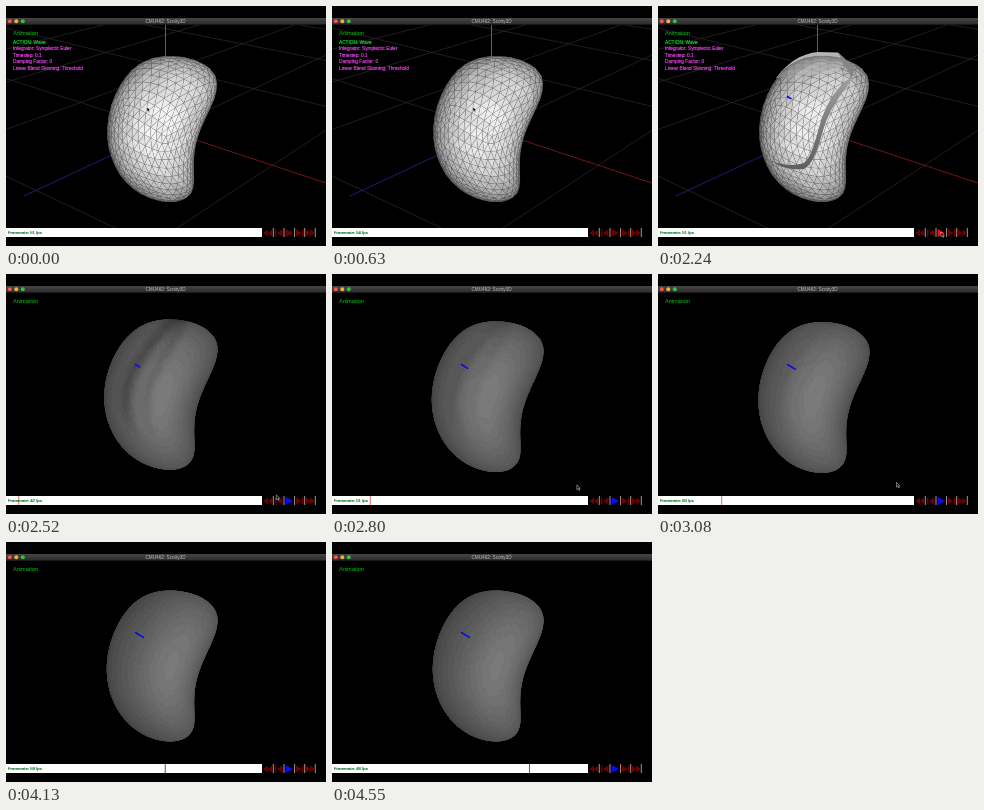
These frames come from a looping animation (320 by 240 pixels, 5110 ms). An HTML page with a canvas:

```html
<!DOCTYPE html>
<html lang="en">
<head>
<meta charset="utf-8">
<title>Mesh animation</title>
<style>
  html, body { margin: 0; width: 100%; height: 100%; overflow: hidden; background: #000; }
  canvas, svg { position: absolute; left: 0; top: 0; width: 320px; height: 240px; }
  text { font-family: "Liberation Sans", Arial, sans-serif; }
  .info { font-size: 4.75px; fill: #e040e0; stroke: #e040e0; stroke-width: .18; }
  .green { fill: #10d830; stroke: #10d830; }
</style>
</head>
<body>
<canvas id="scene" width="320" height="240"></canvas>
<svg viewBox="0 0 320 240">
  <defs>
    <linearGradient id="bar" x1="0" y1="0" x2="0" y2="1">
      <stop offset="0" stop-color="#454545"/><stop offset="1" stop-color="#2b2b2b"/>
    </linearGradient>
  </defs>
  <rect y="12" width="320" height="6.6" fill="url(#bar)"/>
  <circle cx="3.8" cy="15.3" r="2" fill="#f2564d"/>
  <circle cx="10.3" cy="15.3" r="2" fill="#f0b42e"/>
  <circle cx="16.8" cy="15.3" r="2" fill="#35c244"/>
  <text x="159.5" y="17.1" font-size="4.7" fill="#c0c0c0" text-anchor="middle">CMU462: Scotty3D</text>

  <text x="7" y="29.3" font-size="5.6" fill="#00a00a" stroke="#00a00a" stroke-width=".12">Animation</text>
  <g id="info" class="info">
    <text x="7" y="37.6" class="green">ACTION: Wave</text>
    <text x="7" y="44.2">Integrator: Symplectic Euler</text>
    <text x="7" y="50.8">Timestep: 0.1</text>
    <text x="7" y="57.4">Damping Factor: 0</text>
    <text x="7" y="64">Linear Blend Skinning: Threshold</text>
  </g>

  <rect y="222" width="256" height="9" fill="#fff"/>
  <line id="head" y1="222" y2="231" stroke-width=".8"/>
  <text id="fps" x="2" y="228.4" font-size="4.3" fill="#0a7a28" stroke="#0a7a28" stroke-width=".18"></text>
  <path d="M267.3 222v9M278 222v9M288.6 222v9M298.7 222v9M309.3 222v9" stroke="#ddd" stroke-width=".7"/>
  <g fill="#700000">
    <path d="M262 223.5v7l-4.5-3.5zM266.5 223.5v7l-4.5-3.5z"/>
    <path d="M269 223.5h1.4v7h-1.4zM276.5 223.5v7l-5.5-3.5z"/>
    <path d="M290 223.5v7l5.5-3.5zM296 223.5h1.4v7H296z"/>
    <path d="M300 223.5v7l4.5-3.5zM304.3 223.5v7l4.5-3.5z"/>
  </g>
  <path id="play" d="M279.5 223v8l7.5-4z"/>

  <line id="bone" x1="129.5" y1="90.5" stroke="#0808f0" stroke-width="1.5" stroke-linecap="round"/>
  <path id="cursor" d="M0 0V4.6L1.1 3.6 2 5.4 2.8 5 2 3.3H3.4Z" fill="#000" stroke="#fff" stroke-width=".45"/>
</svg>
<script>
const LOOP = 5110, STEP = 70, SELECT = 1050, PRESS = 2170, PLAY = 2380;
const ctx = document.getElementById('scene').getContext('2d');
const el = id => document.getElementById(id);
const ramp = (t, from, to) => Math.min(1, Math.max(0, (t - from) / (to - from)));
const bell = (x, width) => Math.exp(-((x / width) ** 2));

function turn([x, y, z]) {
  const c = Math.cos(.45), s = Math.sin(.45), c2 = Math.cos(.3), s2 = Math.sin(.3);
  const y1 = c * y - s * z, z1 = s * y + c * z;
  return [c2 * x + s2 * z1, y1, c2 * z1 - s2 * x];
}

// Icosahedron split n times along each edge; front half only
function sphere(n) {
  const g = (1 + Math.sqrt(5)) / 2, v = [], tris = [];
  for (const a of [-1, 1]) for (const b of [-g, g]) v.push([0, a, b], [a, b, 0], [b, 0, a]);
  const near = (p, q) => Math.hypot(...p.map((c, m) => c - q[m])) < 2.1;
  const unit = p => { const d = Math.hypot(...p); return p.map(c => c / d); };
  const add = (...p) => {
    const mid = unit([0, 1, 2].map(k => p[0][k] + p[1][k] + p[2][k]));
    if (p.some(q => q[2] > 0)) tris.push({ p, mid });
  };
  for (let i = 0; i < 12; i++) for (let j = 0; j < i; j++) for (let k = 0; k < j; k++) {
    const [A, B, C] = [v[i], v[j], v[k]];
    if (!near(A, B) || !near(B, C) || !near(A, C)) continue;
    const at = (r, s) => turn(unit(A.map((c, m) => c * (n - r - s) + B[m] * r + C[m] * s)));
    for (let r = 0; r < n; r++) for (let s = 0; s < n - r; s++) {
      add(at(r, s), at(r + 1, s), at(r, s + 1));
      if (r + s < n - 1) add(at(r + 1, s), at(r + 1, s + 1), at(r, s + 1));
    }
  }
  return tris.sort((a, b) => a.mid[2] - b.mid[2]);
}
const coarse = sphere(8), fine = sphere(18);

// Bends the unit sphere into a bean
function place([x, y], { top, bottom, left }) {
  const y2 = y * y;
  const center = 148 + 28 * y2 - 12 * y2 * y2 - 16 * y * (1 - y2);
  const width = 46.7 + 19.5 * y2 - 13.5 * y + 6 * y * y2;
  return [center + width * x + left * Math.min(x, 0), (top + bottom) / 2 + y * (bottom - top) / 2];
}

// At rest until played, then a wobble that dies away
function poseAt(t) {
  if (t < PLAY) return { top: 50, bottom: 196, left: 0 };
  const k = Math.exp(-(t - PLAY) / 300);
  return {
    top: 49 - 5 * k, bottom: 199 - 6 * k, left: 4 * k,
    groove: 1.5 * k, light: .18 + .25 * ramp(t, 3080, 3900)
  };
}

function drawMesh(tris, pose, shade, wire) {
  ctx.lineJoin = 'round';
  for (const { p, mid } of tris) {
    const g = Math.round(shade(mid));
    ctx.beginPath();
    p.forEach(q => ctx.lineTo(...place(q, pose)));
    ctx.closePath();
    ctx.fillStyle = `rgb(${g},${g},${g})`;
    ctx.fill();
    ctx.strokeStyle = wire || ctx.fillStyle;
    ctx.lineWidth = wire ? .4 : .8;
    ctx.stroke();
  }
}

function litShade([x, y, z], dim) {
  const grain = 7 * Math.sin(x * 71 + y * 47);
  return Math.min(246, 118 + 126 * Math.max(0, z * .97 + x * .13 - y * .04) + grain - dim);
}

function greyShade([x, y, z], { groove, light }) {
  const glow = 64 + 28 * Math.max(0, z) + 34 * Math.exp(-((x - light) ** 2 * 2 + y * y * .7));
  const fade = 1 / (1 + Math.exp((y - .35) * 9));
  const cut = groove * fade * (24 * bell(x + .55 - .6 * y * y, .13) + 15 * bell(x + .12 - .3 * y * y, .1));
  return Math.round((glow - cut) / 5) * 5;
}

function line([x1, y1], [x2, y2], color) {
  ctx.strokeStyle = color;
  ctx.lineWidth = .7;
  ctx.beginPath();
  ctx.moveTo(x1, y1);
  ctx.lineTo(x2, y2);
  ctx.stroke();
}

function drawGrid() {
  const horizon = 260, origin = [159.5, 124];
  const ground = (a, b) => {
    const drop = 30.7 * a + 49 * b, w = 1 - drop / horizon;
    return [origin[0] + (95 * a - 105 * b) / w, origin[1] + drop / w];
  };
  ctx.save();
  ctx.beginPath();
  ctx.rect(0, 19, 320, 203);
  ctx.clip();
  for (let i = -4; i <= 3; i++) {
    if (!i) continue;
    line(ground(i, -4), ground(i, 3), '#2c2c2c');
    line(ground(-4, i), ground(3, i), '#2c2c2c');
  }
  line(ground(0, -4), origin, '#2c2c2c');
  line(ground(-4, 0), origin, '#2c2c2c');
  line([159.5, 19], origin, '#8a8a8a');
  line(origin, [320, 177], '#a02020');
  line(origin, [18, 190], '#2a2aa8');
  ctx.restore();
}

// Skin torn along the threshold between two bones
function drawCap() {
  ctx.fillStyle = '#b4b4b4';
  ctx.fill(new Path2D('M118 72Q136 48 160 46L180 46.5L187 53L180 66Z'));
}
function drawTear() {
  const shade = ctx.createLinearGradient(0, 70, 0, 160);
  shade.addColorStop(0, '#a0a0a0');
  shade.addColorStop(1, '#606060');
  ctx.fillStyle = shade;
  ctx.fill(new Path2D('M194 72L184 78Q166 98 160 125Q153 152 146 157Q132 162 114 155Q126 165 146 163Q156 158 164 128Q170 104 188 82Z'));
  ctx.fillStyle = '#858585';
  ctx.fill(new Path2D('M180 46.5L187 53L197 62L194 72L187 60Z'));
}

// Steps of 70 ms with a few longer holds
function clock(ms) {
  const t = Math.floor(ms / STEP) * STEP;
  if (t < 560) return 0;
  if (t > 4550) return 4550;
  return [770, 1330, 2310].includes(t) ? t - STEP : t;
}

function draw(t) {
  const playing = t >= PLAY, pressed = t >= PRESS, pose = poseAt(t);
  ctx.fillStyle = '#000';
  ctx.fillRect(0, 0, 320, 240);
  if (playing) {
    drawMesh(fine, pose, m => greyShade(m, pose));
  } else {
    drawGrid();
    if (pressed) drawCap();
    drawMesh(coarse, pose, m => litShade(m, t < 560 ? 0 : 6), 'rgba(60,60,60,.22)');
    if (pressed) drawTear();
  }

  const set = (id, attrs) => Object.entries(attrs).forEach(([k, v]) => el(id).setAttribute(k, v));
  const show = (id, on) => set(id, { visibility: on ? 'visible' : 'hidden' });
  show('info', !playing);
  show('bone', t >= SELECT);
  show('cursor', t < 3500);
  show('head', playing);

  const toBone = ramp(t, 840, 1260), toPlay = ramp(t, 1330, PRESS), away = ramp(t, PLAY, 2870);
  const x = 141 - 9 * toBone + 151 * toPlay - 44.5 * away;
  const y = 101 - 10 * toBone + 135 * toPlay - 17.5 * away;
  set('cursor', { transform: `translate(${x} ${y})` });

  const reach = 8 - 4.5 * ramp(t, PRESS, 2240) + 4.5 * ramp(t, PLAY, 3080);
  set('bone', { x2: 129.5 + reach, y2: 90.5 + reach * .62 });

  const head = (t - PLAY) * .091;
  set('head', { x1: head, x2: head, stroke: t < 3500 ? '#e04040' : '#303030' });
  set('play', { fill: playing ? '#0a0aff' : pressed ? '#f01010' : '#700000' });

  const rate = 51 + 9 * Math.sin((t - 2800) / 560 * Math.PI);
  el('fps').textContent = `Framerate: ${Math.round(rate)} fps`;
}

const start = performance.now();
let last = -1;
function tick() {
  const t = clock((performance.now() - start) % LOOP);
  if (t !== last) draw(last = t);
  requestAnimationFrame(tick);
}
tick();
</script>
</body>
</html>
```
